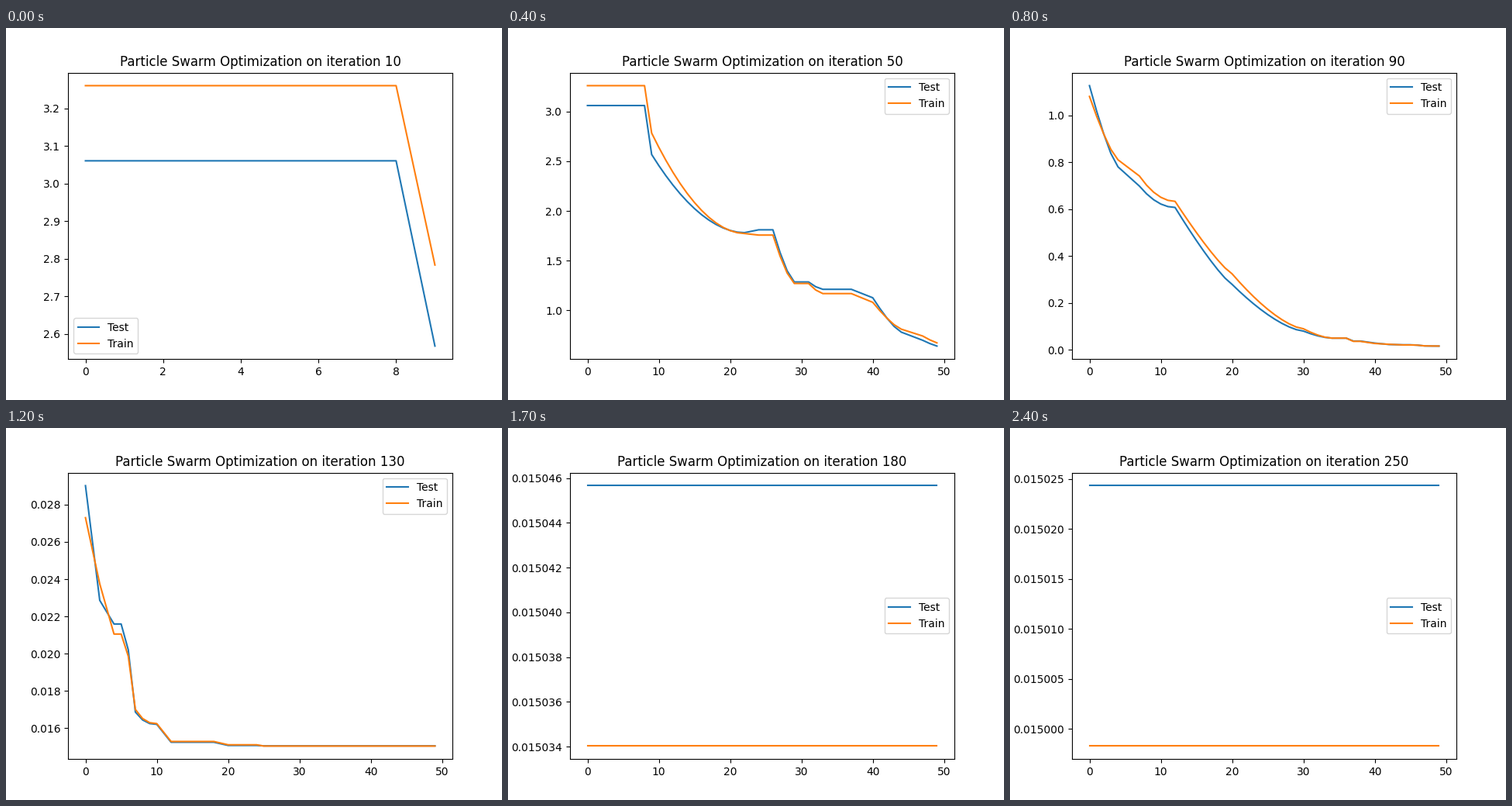
Recreate the animation shown at these times as a matplotlib script. Size 640 px wide and 480 px high, loop 3410 ms.

```python
import numpy as np
import matplotlib.pyplot as plt
from matplotlib.animation import FuncAnimation

WINDOW = 50       # iterations visible at once
STEP = 10         # iterations added per update
LAST = 250
TICK = 10         # ms
LOOP = 3410       # ms, the last view is held

# Each improvement: first iteration, length, test and train reached, easing power
START = (3.061, 3.261)
DROPS = [
    (8, 1, 2.568, 2.7837, 1),
    (9, 13, 1.781, 1.773, 1.9),
    (22, 2, 1.81, 1.757, 1),
    (26, 3, 1.285, 1.27, 1.4),
    (31, 2, 1.211, 1.168, 1.5),
    (37, 3, 1.126, 1.08, 1),
    (40, 4, 0.78, 0.81, 1.3),
    (44, 3, 0.698, 0.741, 1),
    (47, 5, 0.607, 0.633, 2),
    (52, 8, 0.279, 0.324, 1.2),
    (60, 10, 0.08, 0.09, 1.5),
    (70, 4, 0.05, 0.05, 1.6),
    (76, 1, 0.0375, 0.0363, 1),
    (78, 2, 0.02902, 0.0273, 1),
    (80, 2, 0.02286, 0.02375, 1),
    (82, 2, 0.02159, 0.02105, 1),
    (85, 2, 0.01686, 0.017, 0.5),
    (87, 3, 0.0162, 0.01624, 2.5),
    (90, 2, 0.01524, 0.01528, 1),
    (98, 2, 0.01506714, 0.01510236, 1),
    (104, 1, 0.01504566, 0.01503403, 1),
    (192, 1, 0.01502432, 0.01499829, 1),
]


def losses():
    """Test and train loss per iteration: plateaus joined by eased drops."""
    it = np.arange(LAST)[:, None]
    out = np.tile(START, (LAST, 1))
    level = np.array(START)
    for first, length, test, train, power in DROPS:
        goal = np.array([test, train])
        t = np.clip((it - first) / length, 0, 1)
        eased = level + (goal - level) * (1 - (1 - t) ** power)
        out = np.where(it > first, eased, out)
        level = goal
    return out.T


curves = losses()
fig, ax = plt.subplots(figsize=(6.4, 4.8), dpi=100)
lines = [ax.plot([], [], label=name)[0] for name in ("Test", "Train")]
title = ax.set_title("")
ax.legend(loc="best")


def update(frame):
    n = min(STEP * (1 + frame * TICK // 100), LAST)
    start = max(0, n - WINDOW)
    for line, curve in zip(lines, curves):
        line.set_data(np.arange(n - start), curve[start:n])
    ax.relim()
    ax.autoscale_view()
    title.set_text(f"Particle Swarm Optimization on iteration {n}")
    return *lines, title


anim = FuncAnimation(fig, update, frames=LOOP // TICK, interval=TICK,
                     init_func=lambda: update(0), repeat=True,
                     repeat_delay=0, blit=False)
plt.show()
```
